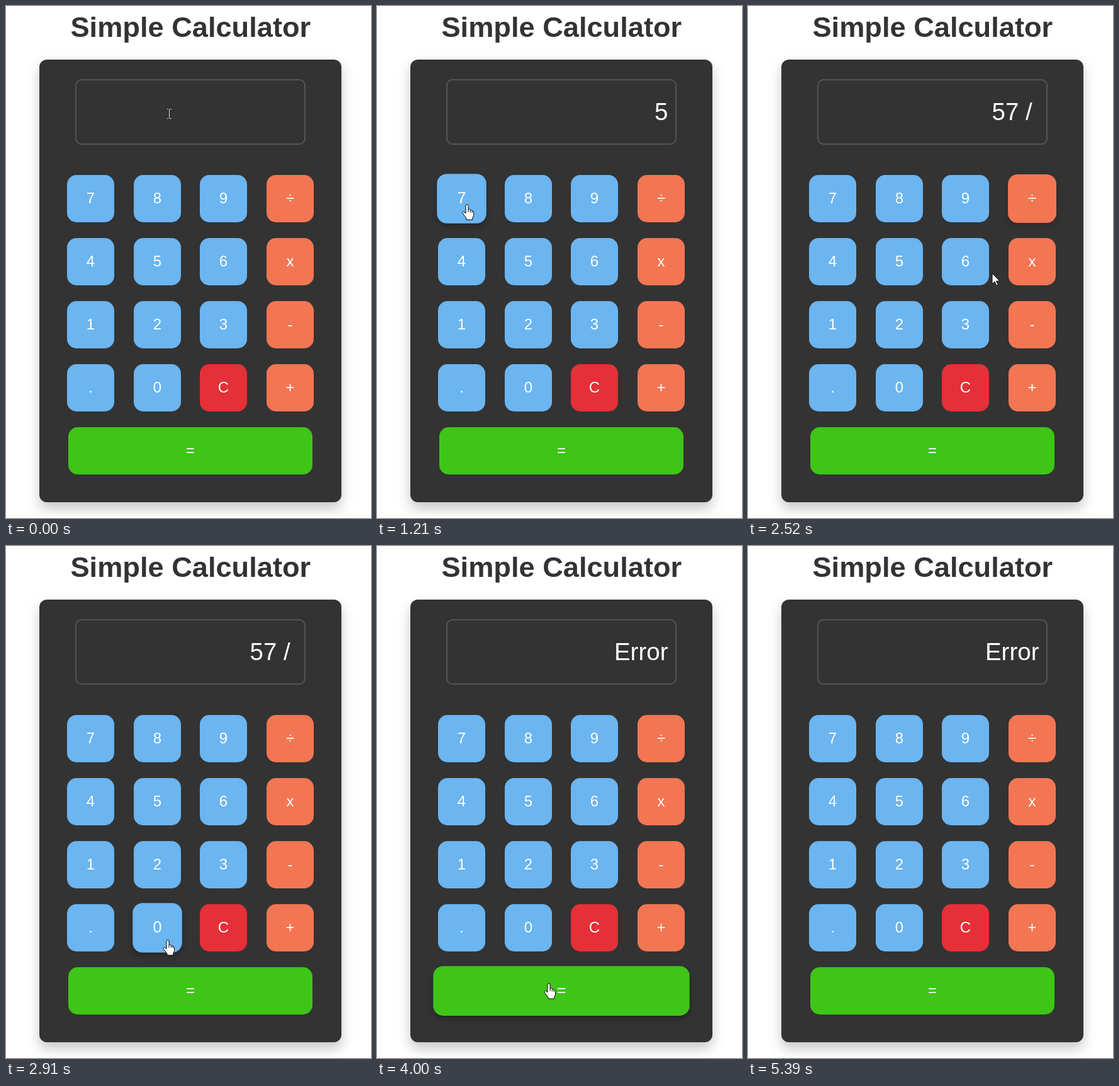
Recreate the animation shown at these times as an HTML page. Size 580 px wide and 812 px high, loop 5420 ms.

```html
<!DOCTYPE html>
<html lang="en">
<head>
<meta charset="utf-8">
<title>Simple Calculator</title>
<style>
  html, body { margin: 0; width: 100%; height: 100%; overflow: hidden; background: #fff; }
  svg { display: block; width: 580px; height: 812px; font-family: "Liberation Sans", Arial, sans-serif; }
  text { fill: #fff; white-space: pre; }
  .card { fill: #333; filter: drop-shadow(0 10px 10px rgba(0, 0, 0, .22)); }
  .title { fill: #333; font-weight: bold; font-size: 45.2px; text-anchor: middle; }
  .screen { fill: none; stroke: #555; stroke-width: 2; }
  .value { font-size: 38.5px; text-anchor: end; }
  .key text { font-size: 24px; text-anchor: middle; }
</style>
</head>
<body>
<svg viewBox="0 0 580 812">
  <text class="title" x="293.3" y="49">Simple Calculator</text>
  <rect class="card" x="53" y="85" width="480" height="702" rx="12"/>
  <rect class="screen" x="111" y="117" width="364" height="102" rx="9"/>
  <text class="value" id="value" x="462.5" y="181" xml:space="preserve"></text>
  <g id="keys"></g>
  <g id="cursor">
    <path id="beam" fill="none" stroke="#d0d0d0" d="M-3 -7.5H-1M1 -7.5H4M.5 -7V7M-3 7.5H-1M1 7.5H4"/>
    <path id="arrow" fill="#fff" stroke="#000" stroke-linejoin="round" d="M0 0V17L4 13.2L6.8 19.5L9.4 18.4L6.7 12.2H12Z"/>
    <g id="hand" stroke="#000" stroke-linejoin="round">
      <path fill="#fff" d="M-2 1.8a2 2 0 0 1 4 0V8.5c.3-1.6 3-1.6 3.3 0V9.6c.4-1.4 2.8-1.2 2.9.3V11c.6-1.2 2.4-.9 2.4.6V16.5c0 2-1.6 3.2-1.8 5.2V24H-1V21.8C-2.4 19.5-4.8 17-6.6 14c-1.2-2 .9-3.4 2.6-1.8L-2 14Z"/>
      <path fill="none" d="M2 8.5V12M5.3 9.6V12.5M8.2 11V13"/>
    </g>
  </g>
</svg>
<script>
const LOOP = 5420, FADE = 200, STEP = 10;
const BLUE = '#6bb5f1', ORANGE = '#f37653', RED = '#e53037', GREEN = '#3ec517';
const $ = id => document.getElementById(id);

// time, x, y of the pointer's hot spot
const path = [
  [0, 259, 171], [330, 237, 373], [450, 237, 378], [560, 238, 385],
  [860, 238, 385], [1180, 143, 315], [1480, 143, 315], [1880, 456, 321],
  [2290, 456, 321], [2880, 257, 625], [3330, 257, 625], [3620, 273, 694],
  [4210, 273, 694], [4430, 268, 650], [4940, 258, -30], [LOOP, 258, -30]
];
const values = [[0, ''], [760, '5'], [1360, '57'], [2210, '57 / '], [3200, '57 / 0'], [3910, 'Error']];

function add(parent, name, attrs) {
  const el = document.createElementNS('http://www.w3.org/2000/svg', name);
  for (const k in attrs) el.setAttribute(k, attrs[k]);
  return parent.appendChild(el);
}

function makeKey(label, x, y, w, fill) {
  const h = 75;
  const g = add($('keys'), 'g', { class: 'key' });
  const rect = add(g, 'rect', { x: -w / 2, y: -h / 2, width: w, height: h, rx: 15, fill });
  add(g, 'text', { x: 0, y: 7.5 }).textContent = label;
  return { g, rect, x, y, w, h };
}

const keys = [...'789÷456x123-.0C+'].map((c, i) => {
  const fill = c === 'C' ? RED : i % 4 === 3 ? ORANGE : BLUE;
  return makeKey(c, Math.round(97 + (i % 4) * 105.6), 268 + Math.floor(i / 4) * 100, 75, fill);
});
keys.push(makeKey('=', 99, 668, 388, GREEN));

function pointer(t) {
  t = Math.max(0, t);
  let i = 1;
  while (i < path.length - 1 && path[i][0] <= t) i++;
  const a = path[i - 1], b = path[i];
  const u = Math.min(1, (t - a[0]) / (b[0] - a[0]));
  const e = u * u * (3 - 2 * u);
  return [a[1] + (b[1] - a[1]) * e, a[2] + (b[2] - a[2]) * e];
}

const inside = ([px, py], r) => px >= r.x && px < r.x + r.w && py >= r.y && py < r.y + r.h;
const textAreas = [{ x: 110, y: 116, w: 366, h: 104 }, { x: 103, y: 8, w: 381, h: 50 }];

// Follow the recent pointer path so each key eases in and out of hover
function hoverLevels(t) {
  const level = keys.map(() => 0);
  for (let s = t - 2 * FADE; s <= t; s += STEP) {
    const p = pointer(s);
    keys.forEach((k, i) => {
      const d = inside(p, k) ? STEP : -STEP;
      level[i] = Math.min(1, Math.max(0, level[i] + d / FADE));
    });
  }
  return level;
}

function render(t) {
  hoverLevels(t).forEach((p, i) => {
    const k = keys[i], e = p * (2 - p);
    k.g.setAttribute('transform', `translate(${k.x + k.w / 2} ${k.y + k.h / 2}) scale(${1 + 0.05 * e})`);
    k.rect.style.filter = e ? `drop-shadow(0 4px 4px rgba(0,0,0,${0.3 * e}))` : 'none';
  });

  $('value').textContent = values.filter(v => v[0] <= t).pop()[1];

  const p = pointer(t).map(Math.round);
  const shape = keys.some(k => inside(p, k)) ? 'hand' : textAreas.some(r => inside(p, r)) ? 'beam' : 'arrow';
  for (const id of ['hand', 'beam', 'arrow']) $(id).style.display = id === shape ? '' : 'none';
  $('cursor').setAttribute('transform', `translate(${p[0]} ${p[1]})`);
}

const start = performance.now();
function tick() {
  render((performance.now() - start) % LOOP);
  requestAnimationFrame(tick);
}
render(0);
requestAnimationFrame(tick);
</script>
</body>
</html>
```
